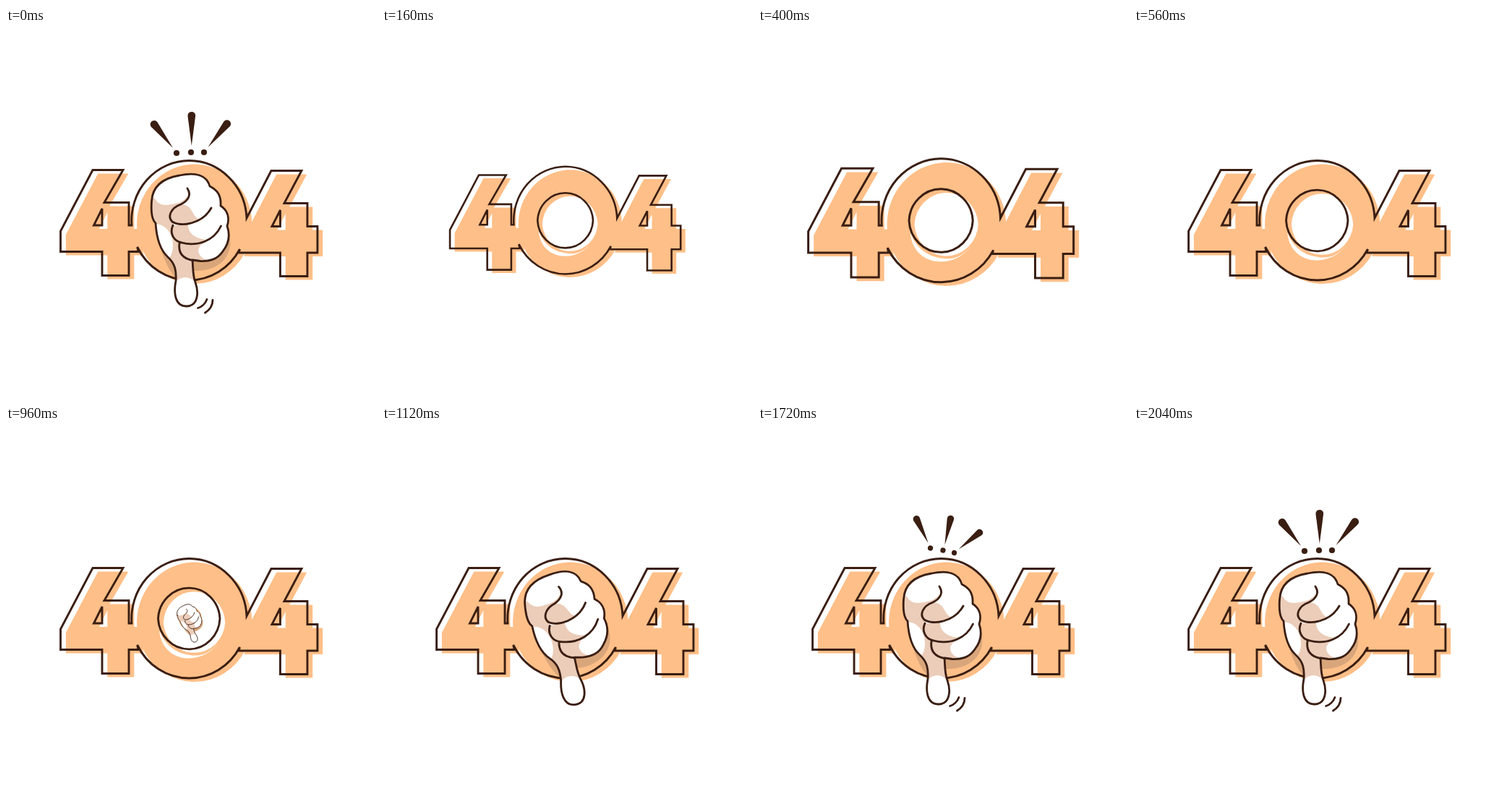
An HTML page for the animation above (2.72 s loop, 512x512 px).

```html
<!DOCTYPE html>
<html lang="en">
<head>
<meta charset="utf-8">
<title>404</title>
<style>
  html, body { margin: 0; width: 100%; height: 100%; overflow: hidden; background: #fff; }
  svg { display: block; width: 100%; height: 100%; }
  .line { fill: none; stroke: #3a1e12; stroke-width: 2.9; stroke-linejoin: miter; }
  .ink { fill: none; stroke: #3a1e12; stroke-width: 2.8; stroke-linecap: round; stroke-linejoin: round; }
  .dark { fill: #3a1e12; }
  .peach { fill: #ffbf88; }
  .skin { fill: #ebcdb9; }
  .shade { fill: #d9a67b; }
  .white { fill: #fff; }
</style>
</head>
<body>
<svg viewBox="0 0 512 512">
  <defs>
    <path id="digits" fill-rule="evenodd" d="
      M120 196.5H162L136 241.5H170V273H174
      A80 83 0 0 1 253.3 183.5A80 83 0 0 1 333 263
      L367 197.5H409L385 242.5H417V274.5H431V311H417V343.5H379.5V311H322L323.5 306
      A80 83 0 0 1 253.3 349A80 83 0 0 1 181.7 303
      L183 309.5H170V342.5H133V309.5H75.5V281Z
      M121.5 273H133V250Z
      M368 274.5H379.5V252Z
      M210.5 266.5A42.8 44.5 0 0 1 296 266.5A42.8 44.5 0 0 1 210.5 266.5Z"/>
    <path id="fist" d="
      M201.5 240C202.5 220 216 208 240 204C263 199 278 204 282 219
      C292 224 298 231 297 246C306 252 310 262 306 274
      C311 288 307 300 300 309C292 321 281 323 269 322.5L258 321
      C259 331 258 341 262 352C267 366 266 385.5 249 385
      C233 384.5 232 365 235 350C236 336 234 326 224 317
      C212 306 208 286 207 270C201.500 265 200.500 254 201.5 240Z"/>
    <path id="drop" d="M0 0L-5.3 -41C-6 -49 6 -49 5.3 -41Z"/>
    <clipPath id="inside"><use href="#fist"/></clipPath>
  </defs>

  <g id="number">
    <use href="#digits" class="peach" x="7.3" y="5"/>
    <path class="white" d="M212 282C216 330 272 332 294 300C284 313 272 318 262 317.5C238 317 220 305 212 282Z"/>
    <use href="#digits" class="line"/>
  </g>

  <g id="hand">
    <ellipse class="peach" cx="257" cy="270" rx="55" ry="56"/>
    <path class="shade" d="M258 322C282 325 302 314 308 284C318 312 296 338 260 336Z"/>
    <path class="shade" d="M215 308C221 326 226 336 235 346L236 330Z"/>
    <use href="#fist" class="white"/>
    <g clip-path="url(#inside)" class="skin">
      <path d="M198 234L206 236C211 245 219 246 228 244C238 243 246 240 251 233L252 238
        C240 245 226 250 227 262L231 270L229 282C232 292 236 296 240 298
        C239 312 244 318 258 321L260 350C254 344 242 343 234 352L226 318
        C231 312 232 302 230 292C227 280 218 271 206 271L196 262Z"/>
      <path d="M230 268C224 258 229 249 244 244C260 246 256 262 270 266C256 273 236 274 230 268Z"/>
      <path d="M231 273C228 283 233 295 243 297C256 300 268 298 278 293C264 292 252 286 252 272Z"/>
      <path d="M240 298C238 310 246 319 262 322H280C262 316 262 302 278 294C262 300 250 299 240 298Z"/>
    </g>
    <use href="#fist" class="ink"/>
    <path class="ink" d="M251 222C257 231 252 239 242 244C228 249 223 261 230 268
      C242 276 272 271 284 249
      M231 273C226 284 232 295 243 297C266 303 288 294 297.5 274
      M240 298C238 312 246 319 258 321.5"/>
  </g>

  <g id="marks" class="ink">
    <path d="M278 375.5C276 381 271 386 265.5 387.5M286 376.5C286 384 282 390 275.5 394"/>
  </g>

  <g id="burst" class="dark">
    <use href="#drop" transform="translate(231 166) rotate(-38.5)"/>
    <use href="#drop" transform="translate(256.8 163)"/>
    <use href="#drop" transform="translate(279.5 165) rotate(39)"/>
    <circle cx="236" cy="173" r="4.1"/>
    <circle cx="256" cy="172" r="4.1"/>
    <circle cx="274" cy="172" r="4.1"/>
  </g>
</svg>
<script>
  const LOOP = 2720, STEP = 40, SPAN = 560;
  const el = id => document.getElementById(id);
  const number = el('number'), hand = el('hand'), marks = el('marks'), burst = el('burst');

  const phase = (t, from) => Math.min(1, Math.max(0, (t - from) / SPAN));

  // Grow from nothing to the peak, then settle at full size.
  function pop(p, peak, at, power) {
    if (p < at) return peak * (1 - (1 - p / at) ** power);
    return 1 + (peak - 1) * ((1 - p) / (1 - at)) ** 2;
  }

  const show = (node, on) => node.setAttribute('visibility', on ? 'visible' : 'hidden');

  function pose(node, x, y, scale, angle) {
    show(node, scale > 0);
    node.setAttribute('transform',
      `translate(${x} ${y}) rotate(${angle}) scale(${scale}) translate(${-x} ${-y})`);
  }

  function draw(time) {
    // The first step of the loop still holds the finished picture.
    const t = Math.floor((time % LOOP) / STEP) * STEP || LOOP;
    const a = phase(t, 0), b = phase(t, 920), c = phase(t, 1480);
    pose(number, 257, 265, pop(a, 1.1, 0.5, 2), 0);
    pose(hand, 253.5, 265, pop(b, 1.1, 0.5, 2), -18 * (1 - b) ** 1.7);
    pose(burst, 256, 172, pop(c, 1.15, 0.557, 1), 22 * (1 - c));
    show(marks, c > 0);
  }

  const start = performance.now();
  function tick() {
    draw(performance.now() - start);
    requestAnimationFrame(tick);
  }
  tick();
</script>
</body>
</html>
```
